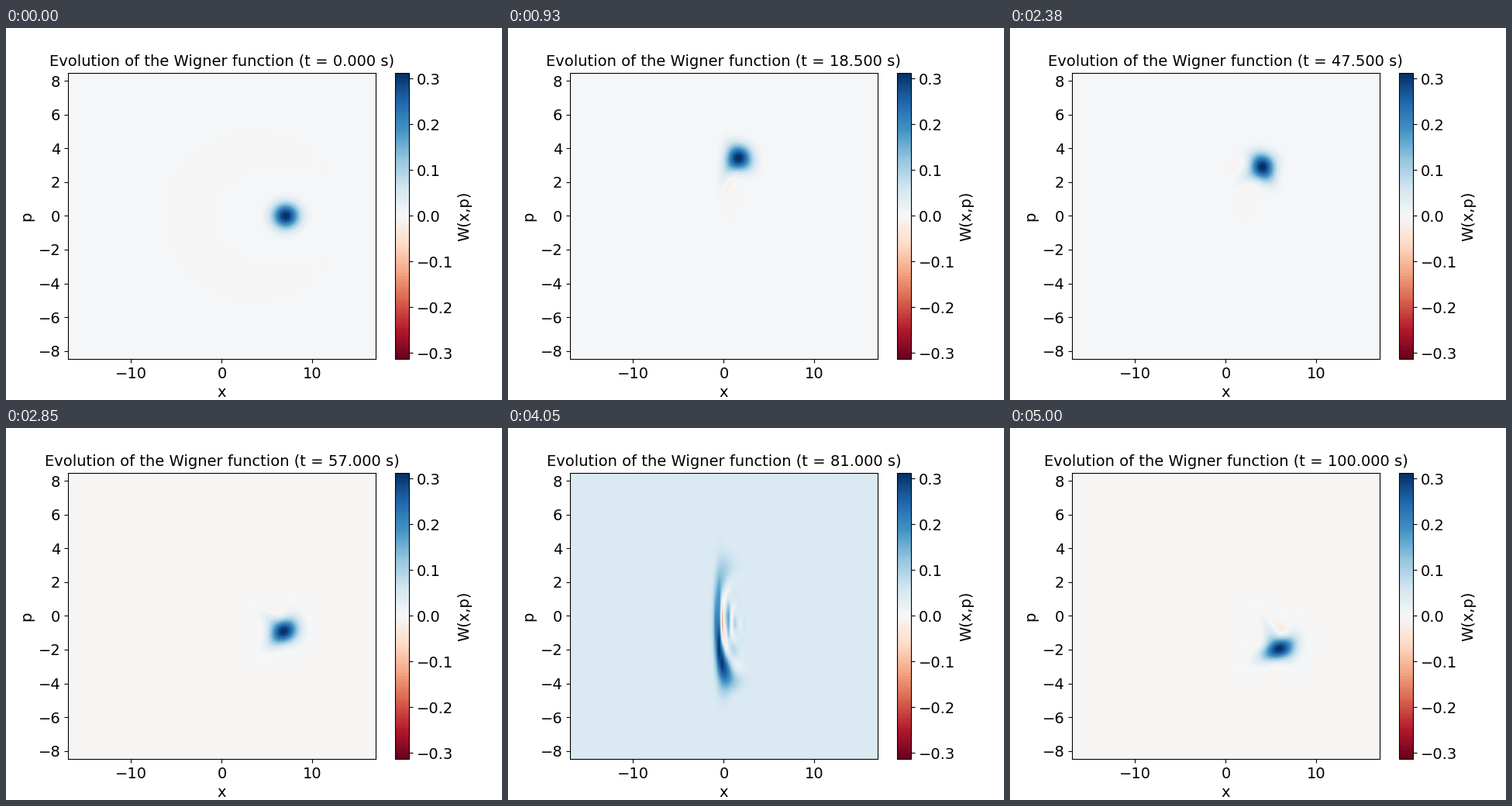
A matplotlib script that plays this animation: 640x480 px, repeating every 5020 ms.

```python
import numpy as np
import matplotlib.pyplot as plt
from matplotlib.animation import FuncAnimation

# Wave packet in a lopsided oscillator: soft on the right, stiff on the left.
LOOP_MS, FRAMES, DT = 5020, 201, 0.5
OMEGA, OMEGA_WALL = 0.5, 4.0
STATES, START = 50, 5.0          # Fock basis size, initial displacement
BANDS = 101
FONT = 14

plt.rcParams.update({"font.family": "DejaVu Sans", "font.size": FONT})


def hermite_functions(x):
    """Oscillator eigenfunctions 0..STATES-1 at the points x."""
    phi = np.empty((STATES, x.size))
    phi[0] = np.pi ** -0.25 * np.exp(-x * x / 2)
    phi[1] = np.sqrt(2) * x * phi[0]
    for k in range(2, STATES):
        phi[k] = np.sqrt(2 / k) * x * phi[k - 1] - np.sqrt((k - 1) / k) * phi[k - 2]
    return phi


# Hamiltonian in dimensionless units
n = np.arange(STATES)
s = np.linspace(-16, 0, 8001)
wall = hermite_functions(s)
stiff = (OMEGA_WALL ** 2 - OMEGA ** 2) / (2 * OMEGA)
H = np.diag(OMEGA * (n + 0.5)) + stiff * (wall * s ** 2) @ wall.T * (s[1] - s[0])
energy, modes = np.linalg.eigh(H)

# Coherent state, expanded in the energy modes
c0 = np.cumprod(np.r_[1, START / np.sqrt(2 * n[1:])])
amps = modes.T @ (c0 / np.linalg.norm(c0))

# Phase space grid and the kernels of the Wigner integral
grid = np.linspace(-12, 12, 100)
y = np.linspace(-12, 12, 201)
phi = hermite_functions((grid[:, None] + y).ravel())
kernel = np.exp(2j * np.outer(y, grid)) * (y[1] - y[0]) / np.pi
xs, ps = grid / np.sqrt(OMEGA), grid * np.sqrt(OMEGA)


def wigner(t):
    c = modes @ (np.exp(-1j * energy * t) * amps)
    psi = (c.real @ phi + 1j * (c.imag @ phi)).reshape(grid.size, y.size)
    return ((psi.conj() * psi[:, ::-1]) @ kernel).real.T + 1e-12


fig, ax = plt.subplots(figsize=(6.4, 4.8), dpi=100)
floor = -wigner(0).max()


def fill(w):
    return ax.contourf(xs, ps, w, levels=np.linspace(floor, w.max(), BANDS), cmap="RdBu")


layer = [fill(wigner(0))]
bar = fig.colorbar(layer[0], ax=ax, ticks=np.arange(-3, 4) / 10)
bar.set_label("W(x,p)", fontsize=FONT)
ax.set_xlabel("x")
ax.set_ylabel("p")
ax.set_xticks([-10, 0, 10])
ax.set_yticks(range(-8, 9, 2))
ax.set_xlim(xs[0], xs[-1])
ax.set_ylim(ps[0], ps[-1])


def update(i):
    t = i * DT
    layer[0].remove()
    layer[0] = fill(wigner(t))
    ax.set_title(f"Evolution of the Wigner function (t = {t:.3f} s)", fontsize=FONT)
    return layer


ani = FuncAnimation(fig, update, frames=FRAMES, interval=LOOP_MS / FRAMES,
                    repeat=True, repeat_delay=0, blit=False)
plt.show()
```
